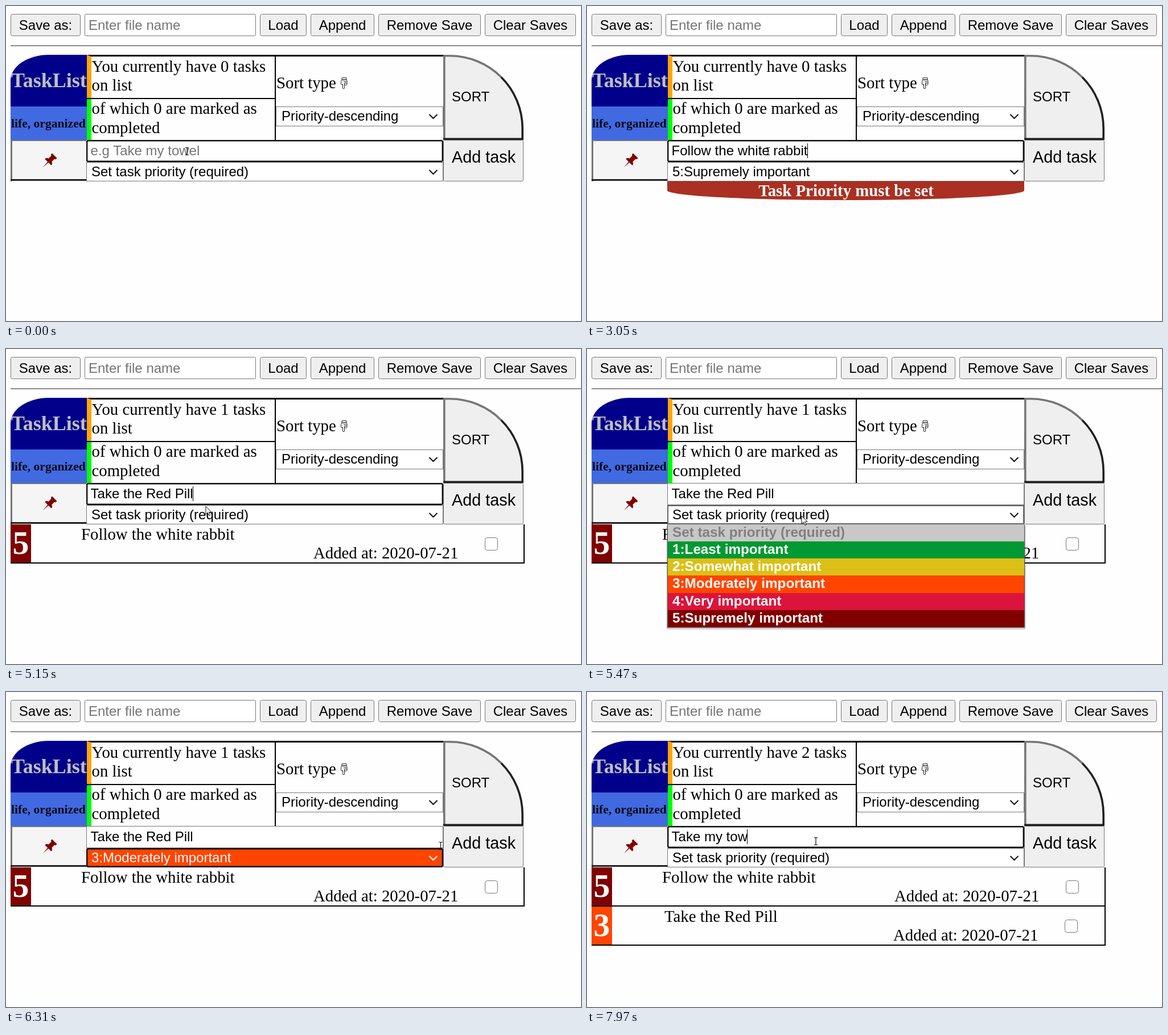
An HTML page that plays this animation: 1010x555 px, repeating every 7990 ms.

```html
<!DOCTYPE html>
<html lang="en">
<head>
<meta charset="utf-8">
<title>Task list</title>
<style>
  html, body { margin: 0; width: 100%; height: 100%; overflow: hidden; background: #fefefe; }
  svg { display: block; width: 100%; height: 100%; }
  text { white-space: pre; font: 24px "Liberation Sans", Arial, sans-serif; }
  .serif { font: 28.8px "Liberation Serif", "Times New Roman", serif; }
  .bold { font-weight: bold; }
  .option { font-size: 24.25px; font-weight: bold; }
</style>
</head>
<body>
<svg id="stage" viewBox="0 0 1010 555"></svg>
<script>
const LOOP = 7990;
const GREY = '#767676', DARK = '#212121', FACE = '#efefef';
const LEFT = 141, RIGHT = 768;
const TEXT_X = 148.6;
const stage = document.getElementById('stage');

function el(tag, attrs, parent = stage) {
  const node = document.createElementNS('http://www.w3.org/2000/svg', tag);
  for (const key in attrs) node.setAttribute(key, attrs[key]);
  parent.appendChild(node);
  return node;
}
const rect = (x, y, width, height, fill, parent) => el('rect', { x, y, width, height, fill }, parent);
const path = (d, attrs, parent) => el('path', { d, fill: 'none', ...attrs }, parent);
function text(x, y, string, attrs, parent) {
  const node = el('text', { x, y, ...attrs }, parent);
  node.textContent = string;
  return node;
}
const serif = (x, y, string, parent) => text(x, y, string, { class: 'serif' }, parent);
// Bordered box given by its outer edges.
function box(x1, y1, x2, y2, fill, rx = 0, parent) {
  return el('rect', {
    x: x1 + .5, y: y1 + .5, width: x2 - x1 - 1, height: y2 - y1 - 1, rx, fill, stroke: GREY
  }, parent);
}
const chevron = y => path(`M743.5 ${y - 3}l7 7 7-7`, { stroke: '#111', 'stroke-width': 2 });
const show = (node, on) => node.setAttribute('display', on ? 'inline' : 'none');

// Toolbar
function button(x1, x2, label) {
  box(x1, 14, x2, 53, FACE, 3);
  text((x1 + x2) / 2, 41.5, label, { 'text-anchor': 'middle' });
}
button(8, 131, 'Save as:');
box(138, 14, 439, 53, '#fff', 2);
text(145, 41.5, 'Enter file name', { fill: '#757575' });
button(446, 528, 'Load');
button(535, 647, 'Append');
button(654, 834, 'Remove Save');
button(841, 1001, 'Clear Saves');
rect(8, 69, 1002, 2, '#8c8c8c');

// Header
path('M8 177V131.5A67 45.5 0 0 1 75 86H142V177Z', { fill: '#00008b' });
text(9, 143, 'TaskList', { class: 'serif bold', fill: 'silver', style: 'font-size:36px' });
rect(8, 177, 134, 59, '#4169e1');
text(9, 213.5, 'life, organized', { class: 'serif bold', fill: '#0a0a14', style: 'font-size:21.6px' });
rect(142, 86, 626, 3, '#000');
path('M142 86L150 89V162H142Z', { fill: 'orange' });
rect(142, 163, 8, 73, 'lime');
rect(142, 162, 331, 2, '#000');
rect(472, 88, 2, 148, '#000');
const count = serif(150.5, 116, '');
serif(150.5, 149, 'on list');
serif(150.5, 190, 'of which 0 are marked as');
serif(150.5, 223.5, 'completed');
serif(475, 145, 'Sort type');

// Hand pointing down
path('M590 126.5h8v3.5h-8zM590 130q-2 2-1.5 5v3q1.5 1.5 3 0v7q1.5 1.5 3 0v-6q4 1 4.5-1v-5q0-2-1-3zM594.5 139v-3h4M593 133.5h5', {
  stroke: '#222'
});
box(474, 177, 768, 212, '#fff');
text(484, 202, 'Priority-descending');
chevron(194);

// Sort button with one rounded corner
path('M768 236V86H779.4A129.6 129.6 0 0 1 909 215.6V236Z', { fill: FACE });
const edge = { 'stroke-width': 3.6 }, radius = 127.8;
const midX = 779.4 + radius * Math.SQRT1_2, midY = 215.6 - radius * Math.SQRT1_2;
path(`M769.8 236V87.8H779.4A${radius} ${radius} 0 0 1 ${midX} ${midY}`, { ...edge, stroke: GREY });
path(`M${midX} ${midY}A${radius} ${radius} 0 0 1 907.2 215.6V234.2H768`, { ...edge, stroke: DARK });
text(783, 168, 'SORT');

// Pin cell
rect(8, 236, 133, 73, '#f5f5f5');
rect(8, 236, 133, 2, GREY);
rect(8, 236, 3, 73, GREY);
rect(8, 305, 133, 3, DARK);
path('M-6-13h12v3l-2 1v7q4 1 4 5H1L0 16-1 3H-8q0-4 4-5v-7l-2-1z', {
  fill: '#800000', transform: 'translate(76 273) rotate(45)'
});

// Add button
box(768, 236, 909, 309, FACE, 2);
text(783, 276, 'Add task', { style: 'font-size:28.8px' });

// Entry field and priority picker
const field = box(LEFT, 236, RIGHT, 275, '#fff');
const picker = box(LEFT, 275, RIGHT, 309, '#fff');
const entry = text(TEXT_X, 263, '');
const caret = rect(0, 242, 1, 26, '#000');
const choice = text(150, 300, '');
const arrowMark = chevron(292);

function frame(node, y1, y2, width, color, rx) {
  const half = width / 2;
  const attrs = {
    x: LEFT + half, y: y1 + half, width: RIGHT - LEFT - width, height: y2 - y1 - width,
    rx, stroke: color, 'stroke-width': width
  };
  for (const key in attrs) node.setAttribute(key, attrs[key]);
}

// Warning banner
const banner = el('g', {});
path('M141 309H768V325A313.5 17 0 0 1 141 325Z', { fill: '#a93022' }, banner);
text(455, 335, 'Task Priority must be set', { class: 'serif bold', fill: '#fff', 'text-anchor': 'middle' }, banner);

// Task rows
function taskRow(y, level, color, title, titleX, dateX) {
  const g = el('g', {});
  rect(8, y, 36, 68, color, g);
  text(26, y + 52, level, {
    class: 'serif bold', fill: '#fff', 'text-anchor': 'middle', style: 'font-size:57.6px'
  }, g);
  serif(titleX, y + 27, title, g);
  serif(dateX, y + 60, 'Added at: 2020-07-21', g);
  box(dateX + 301, y + 23, dateX + 324, y + 46, '#fff', 4, g);
  rect(8, y + 67, 903, 2, '#000', g);
  rect(909, y, 2, 69, '#000', g);
  return g;
}
const rows = [
  taskRow(309, 5, '#800000', 'Follow the white rabbit', 132, 540),
  taskRow(378, 3, '#ff4500', 'Take the Red Pill', 136, 538)
];

// Drop-down list
const PROMPT = 'Set task priority (required)';
const OPTIONS = [
  ['1:Least important', '#009933'],
  ['2:Somewhat important', '#dcc018'],
  ['3:Moderately important', '#ff4500'],
  ['4:Very important', '#dc143c'],
  ['5:Supremely important', '#800000']
];
const list = el('g', {});
for (let i = 4; i > 0; i--) {
  el('rect', { x: LEFT - i / 2, y: 311, width: 628 + i, height: 180 + i, rx: 2, fill: '#000', opacity: .07 }, list);
}
rect(LEFT, 309, 628, 182, '#555', list);
rect(142, 309, 626, 31, '#c8c8c8', list);
text(150, 331, PROMPT, { class: 'option', fill: '#808080' }, list);
const itemTop = i => Math.round(339 + i * 30.2);
const items = OPTIONS.map(([label, color], i) => {
  const y = itemTop(i), bottom = itemTop(i + 1);
  return {
    y, bottom, color,
    back: rect(142, y, 626, bottom - y, color, list),
    label: text(150, y + 22, label, { class: 'option' }, list)
  };
});

// Mouse pointers
const beam = path('M-3-6.5H-1L0-5.5 1-6.5H3M0-5.5V5.5M-3 6.5H-1L0 5.5 1 6.5H3', { stroke: '#111', 'stroke-width': 1.2 });
const arrow = path('M0 0V14L3.3 11 5.7 16.5 8 15.5 5.6 10.2H10Z', { fill: '#fff', stroke: '#111' });

// Timeline
const ADD = [3250, 6560], OPEN = 5430, PICK = 6130;
const PHRASES = [
  ['Follow the white rabbit', [140, 220, 420, 470, 530, 580, 640, 710, 770, 840, 920, 1060, 1160,
    1360, 1440, 1510, 1590, 1680, 1770, 1870, 1920, 1970, 2110]],
  ['Take the Red Pill', [3500, 3580, 3680, 3770, 3850, 3990, 4040, 4080, 4130, 4250, 4330, 4410,
    4490, 4630, 4700, 4760, 4830]],
  ['Take my tow', [6930, 6970, 7010, 7060, 7250, 7390, 7470, 7550, 7690, 7810, 7950]]
];
const CARET_OFF = [[0, 140], [2290, 2430], [2830, 2970]];
const MOUSE = [
  [0, 318, 256], [4950, 318, 256], [5310, 377, 294], [5520, 377, 294], [5970, 370, 412],
  [6130, 372, 414], [6310, 763, 271], [6420, 820, 272], [6600, 820, 272], [6890, 402, 263], [LOOP, 402, 263]
];
const within = (t, a, b) => t >= a && t < b;
const pen = document.createElement('canvas').getContext('2d');
pen.font = '24px "Liberation Sans", Arial, sans-serif';

function mouseAt(t) {
  const i = MOUSE.findIndex(p => p[0] > t);
  const [t0, x0, y0] = MOUSE[i - 1], [t1, x1, y1] = MOUSE[i];
  const k = (t - t0) / (t1 - t0);
  return [x0 + (x1 - x0) * k, y0 + (y1 - y0) * k];
}

function draw(t) {
  const done = ADD.filter(a => t >= a).length;
  count.textContent = `You currently have ${done} tasks`;
  rows.forEach((row, i) => show(row, i < done));
  show(banner, within(t, 2530, ADD[0]));

  const [phrase, keys] = PHRASES[done];
  const typed = phrase.slice(0, keys.filter(k => t >= k).length);
  entry.textContent = typed || 'e.g Take my towel';
  entry.setAttribute('fill', typed ? '#000' : '#757575');

  const open = within(t, OPEN, PICK), picked = within(t, PICK, ADD[1]);
  const focused = !open && !picked;
  frame(field, 236, 275, focused ? 2.4 : 1, focused ? '#101010' : GREY, focused ? 2 : 0);
  show(caret, focused && !CARET_OFF.some(([a, b]) => within(t, a, b)));
  caret.setAttribute('x', Math.round(TEXT_X + pen.measureText(typed).width - .6));

  frame(picker, 275, 309, open ? 2 : picked ? 2.4 : 1, picked ? '#101010' : open ? '#666' : GREY, picked ? 2 : 0);
  picker.setAttribute('fill', picked ? '#ff4500' : '#fff');
  choice.setAttribute('fill', picked ? '#fff' : '#000');
  arrowMark.setAttribute('stroke', picked ? '#fff' : '#111');
  choice.textContent = picked ? OPTIONS[2][0] : within(t, 3050, ADD[0]) ? OPTIONS[4][0] : PROMPT;

  const [x, y] = mouseAt(t);
  show(list, open);
  for (const item of items) {
    const hover = within(y, item.y, item.bottom);
    item.back.setAttribute('fill', hover ? '#cecece' : item.color);
    item.label.setAttribute('fill', hover ? '#101010' : '#fff');
  }
  const overField = !open && within(x, LEFT, RIGHT) && within(y, 236, 275);
  show(beam, overField);
  show(arrow, !overField);
  (overField ? beam : arrow).setAttribute('transform', `translate(${x} ${y})`);
}

const start = performance.now();
function tick() {
  draw((performance.now() - start) % LOOP);
  requestAnimationFrame(tick);
}
tick();
</script>
</body>
</html>
```
